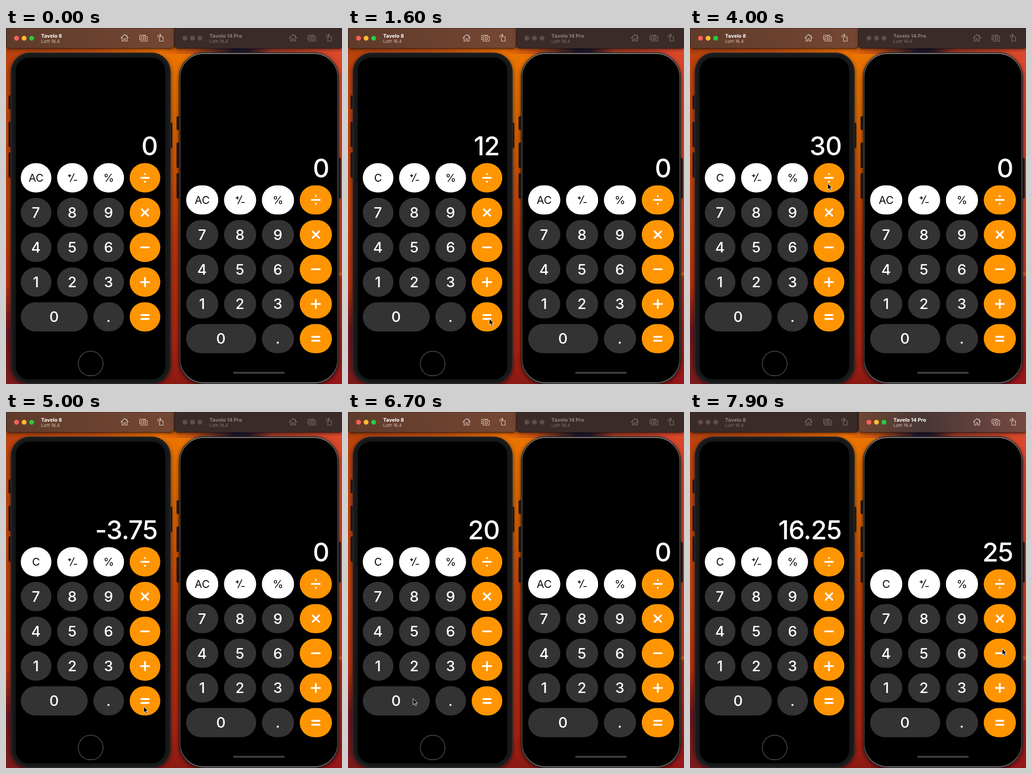
An HTML page that plays this animation: 728x769 px, repeating every 8 s.

```html
<!DOCTYPE html>
<html lang="en">
<head>
<meta charset="utf-8">
<title>Two calculators</title>
<style>
  html, body { margin: 0; width: 100%; height: 100%; overflow: hidden; }
  body {
    background:
      linear-gradient(90deg, #b0410f, #c85010 25%, #f07000 46%, #bf4d17 56%, #1c1830 68%, #241a2e 72%, #a53c27 79%, #dc4a2c) 0 0 / 100% 56px no-repeat,
      linear-gradient(#b9430f, #bd410d 50%, #b5300f 72%, #68161f 85%, #7a1c1e) 0 0 / 190px 100% no-repeat,
      linear-gradient(#f27a00, #d86800 22%, #b5340f 60%, #a82412 90%, #8a1a14) 190px 0 / 360px 100% no-repeat,
      linear-gradient(#dc4a2c, #c93a18 68.5%, #e06a14 69%, #b82a14 70%, #96161a) 550px 0 / 178px 100% no-repeat;
  }
  svg { display: block; width: 728px; height: 769px; }
  text { font-family: Inter, Roboto, "Liberation Sans", sans-serif; }
  .key { font-size: 31.5px; font-weight: 500; fill: #fff; text-anchor: middle; }
  .func { font-size: 23.5px; fill: #0c0c0c; text-anchor: middle; }
  .display { font-size: 56px; font-weight: 500; fill: #fff; text-anchor: end; letter-spacing: -.018em; }
  .title { font-size: 11px; font-weight: 700; fill: #fff; }
  .sub { font-size: 9.5px; fill: #d2c2ba; }
  .icon { fill: none; stroke: #ddcfc8; stroke-width: 1.2; stroke-linejoin: round; stroke-linecap: round; }
  .op { fill: none; stroke: #fff; stroke-width: 3.8; stroke-linecap: round; }
  .sign { fill: none; stroke: #0c0c0c; stroke-width: 1.8; }
  .side { fill: #241d1c; stroke: #111; stroke-width: .8; }
  .body { filter: drop-shadow(0 3px 5px #0009); }
  .bar { filter: drop-shadow(0 2px 3px #0008); }
  .off .light { fill: #5c4e4b; }
  .off .title { fill: #8e807c; }
  .off .sub { fill: #82746f; }
  .off .icon { stroke: #85756f; }
  .off .bar { fill: #3a2b29; }
</style>
</head>
<body>
<svg id="stage" viewBox="0 0 728 769">
  <defs>
    <linearGradient id="bar0"><stop stop-color="#5f3b2b"/><stop offset="1" stop-color="#744733"/></linearGradient>
    <linearGradient id="bar1"><stop stop-color="#704632"/><stop offset=".38" stop-color="#493637"/><stop offset="1" stop-color="#754a40"/></linearGradient>
    <linearGradient id="rim" x2="0" y2="1"><stop stop-color="#85817f"/><stop offset=".08" stop-color="#4b4b4d"/><stop offset=".93" stop-color="#434345"/><stop offset="1" stop-color="#77777a"/></linearGradient>
  </defs>
</svg>
<script>
const stage = document.getElementById('stage');

function add(parent, tag, attrs, content = '') {
  const el = document.createElementNS('http://www.w3.org/2000/svg', tag);
  for (const name in attrs) el.setAttribute(name, attrs[name]);
  el.textContent = content;
  return parent.appendChild(el);
}
const rect = (x, y, width, height, rx, more) =>
  add(stage, 'rect', { x, y, width, height, rx, ...more });
const label = (x, y, kind, content, parent = stage) =>
  add(parent, 'text', { x, y, class: kind }, content);

const icons = [
  // Home
  'M249 21.5L257 14L265 21.5M251.5 20V28.5H255.3V23H258.7V28.5H262.5V20M262 18V15',
  // Screenshot
  'M292 25.5H291Q289.5 25.5 289.5 24V17Q289.5 15.500 291 15.5H301Q302.5 15.5 302.5 17',
  'M293 18.5H296.5L298 17H301.500L303 18.5H306V28.5H293ZM302.2 23.3A2.7 2.7 0 1 1 296.8 23.3A2.7 2.7 0 1 1 302.2 23.3',
  // Rotate
  'M332.5 19H340.5V28.5H332.5ZM329 20V17.5Q329 15.5 331 15.5H336M333.5 13L336 15.5L333.5 18'
];

function titleBar(x, id, name) {
  const g = add(stage, 'g', { transform: `translate(${x})` });
  add(g, 'path', {
    class: 'bar', d: 'M.5 0H365V36Q365 44 357 44H8.5Q.5 44 .5 36Z',
    fill: `url(#${id})`, stroke: '#201512', 'stroke-width': .8
  });
  ['#ff5f57', '#febc2e', '#28c840'].forEach((fill, i) =>
    add(g, 'circle', { class: 'light', cx: 22.8 + 16.4 * i, cy: 22, r: 5.3, fill }));
  label(76, 20.5, 'title', name, g);
  label(76, 32.3, 'sub', 'Lum 16.4', g);
  icons.forEach(d => add(g, 'path', { class: 'icon', d }));
  return g;
}

const opShapes = {
  '÷': 'M-8.5 0H8.5M0 -8.5V-8M0 8V8.5',
  '×': 'M-7 -7L7 7M7 -7L-7 7',
  '−': 'M-8.5 0H8.5',
  '+': 'M-9 0H9M0 -9V9',
  '=': 'M-8 -4H8M-8 4.5H8'
};

// Draws the keys; returns their centres and the AC/C label. S is the sign key.
function keypad(x0, y0, w, h, dx, dy) {
  const keys = {};
  let clear;
  ['CS%÷', '789×', '456−', '123+', '0 .='].forEach((row, r) => [...row].forEach((key, c) => {
    if (key === ' ') return;
    const x = x0 + c * dx, y = y0 + r * dy;
    const width = key === '0' ? w + dx : w;
    const cx = x + width / 2, cy = y + h / 2;
    const transform = `translate(${cx} ${cy})`;
    keys[key] = [x + width - w / 2, cy];
    rect(x, y, width, h, h / 2, { fill: c === 3 ? '#ff9502' : r ? '#333' : '#fff' });
    if (c === 3) add(stage, 'path', { class: 'op', d: opShapes[key], transform });
    else if (key === 'S') add(stage, 'path', { class: 'sign', d: 'M-9.5 -4.5H-2.5M-6 -8V-1M4 -9.5L-5 9M2.8 5.5H10', transform });
    else if (r) label(cx - .4, cy + 11.3, 'key', key);
    else {
      const el = label(cx, cy + 8.6, 'func', key);
      if (key === 'C') clear = el;
    }
  }));
  return { keys, clear };
}

// Volume and mute buttons on the left edge
const sideButtons = (x, y) => [0, 57, 123].forEach((dy, i) =>
  rect(x, y + dy, 6, i ? 54 : 29, 2, { class: 'side' }));

// Left phone
sideButtons(6, 146);
rect(354, 205, 6, 54, 2, { class: 'side' });
rect(10.5, 53.5, 346, 715, 41, { class: 'body', fill: '#1b1c1d', stroke: '#343434' });
rect(15, 58, 337, 706, 36, { fill: '#161718' });
rect(21, 64, 324, 695, 29);
add(stage, 'path', { d: 'M177 751A26.8 26.8 0 1 1 190 751Z', stroke: '#454547', 'stroke-width': 1.8 });

// Right phone
sideButtons(370, 191);
rect(719, 281, 6, 87, 2, { class: 'side' });
rect(375.5, 53.5, 345, 714.5, 53, { class: 'body', fill: '#101011', stroke: '#1a1a1b', 'stroke-width': 1.5 });
rect(377, 55, 342, 711.5, 51, { fill: '#080808', stroke: 'url(#rim)', 'stroke-width': 1.8 });
rect(380, 58, 336, 706, 48);
rect(492, 742.8, 112, 4, 2, { fill: '#3f3f41' });

const phones = [
  { bar: titleBar(0, 'bar0', 'Tavelo 8'), ...keypad(32, 292, 66.4, 63.2, 78.65, 75.1), display: label(328.3, 274.5, 'display') },
  { bar: titleBar(364.8, 'bar1', 'Tavelo 14 Pro'), ...keypad(390.3, 340, 69.7, 62.8, 82.05, 74.9), display: label(699.8, 323, 'display') }
];

const cursor = add(stage, 'path', {
  d: 'M0 0V13.5L3.2 10.6L5.4 15.5L7.7 14.5L5.6 9.8H9.8Z',
  stroke: '#fff', 'stroke-linejoin': 'round'
});

const apply = {
  '+': (a, b) => a + b, '−': (a, b) => a - b,
  '×': (a, b) => a * b, '÷': (a, b) => a / b, '=': (a, b) => b
};

function calculator() {
  let shown = '0', total = 0, pending = '=', fresh = true;
  return key => {
    if (key === 'S') shown = String(-shown);
    else if (key in apply) {
      if (!fresh) shown = String(apply[pending](total, +shown));
      total = +shown;
      pending = key;
      fresh = true;
    } else {
      shown = fresh ? key : shown + key;
      fresh = false;
    }
    return shown;
  };
}

// Evenly spaced presses: phone, first and last time, keys, pointer offset from key centres
const runs = [
  [0, 300, 1500, '7+5=', 5, 4],
  [0, 1900, 2400, '−6=', 5, -3],
  [0, 2850, 3400, '×5=', 5, -1],
  [0, 4000, 4900, '÷8S=', -3, 12],
  [0, 5300, 6000, '++', -11, -6],
  [0, 6100, 7000, '20=', -3, -5],
  [1, 7500, 7700, '25', -5, 0],
  [1, 7900, 7900, '−', 5, -10]
];
const calculators = phones.map(calculator);
const presses = runs.flatMap(([phone, from, to, keys, dx, dy]) => [...keys].map((key, i) => {
  const [x, y] = phones[phone].keys[key];
  const time = from + (to - from) * i / Math.max(1, keys.length - 1);
  return { phone, time, x: x + dx, y: y + dy, value: calculators[phone](key) };
}));

// The pointer rests on a key, then travels to reach the next one on time
function pointerAt(t) {
  const next = presses.findIndex(p => p.time >= t);
  const b = presses[next], a = presses[next - 1] ?? b;
  const p = Math.max(0, 1 - (b.time - t) / Math.min(250, b.time - a.time || 1));
  const e = p * p * (3 - 2 * p);
  return [a.x + (b.x - a.x) * e, a.y + (b.y - a.y) * e];
}

function draw(now) {
  const t = Math.floor(now % 8000 / 100) * 100;
  const done = presses.filter(p => p.time < t);
  const active = done.at(-1)?.phone ?? 0;
  phones.forEach((phone, i) => {
    const value = done.findLast(p => p.phone === i)?.value ?? '0';
    phone.display.textContent = value;
    phone.clear.textContent = value === '0' ? 'AC' : 'C';
    phone.bar.setAttribute('class', i === active ? '' : 'off');
  });
  cursor.setAttribute('visibility', t ? 'visible' : 'hidden');
  cursor.setAttribute('transform', `translate(${pointerAt(t)})`);
}

let start;
function tick(now) {
  start ??= now;
  draw(now - start);
  requestAnimationFrame(tick);
}
draw(0);
requestAnimationFrame(tick);
</script>
</body>
</html>
```
